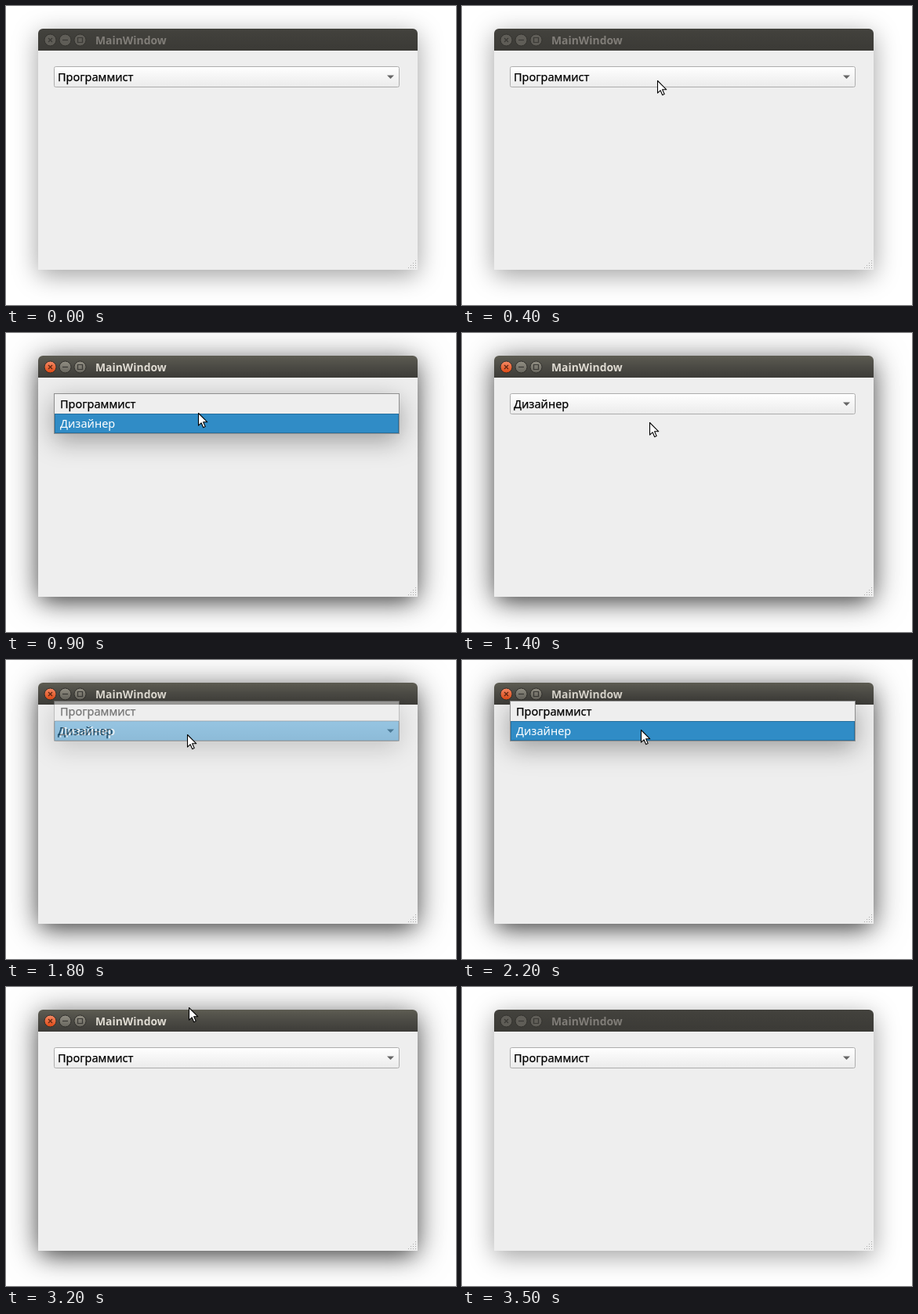
Animation of 574x382 px, one loop 3.6 s. Source, as an HTML page:

```html
<!DOCTYPE html>
<html lang="ru">
<head>
<meta charset="utf-8">
<title>MainWindow</title>
<style>
  html, body { margin: 0; width: 100%; height: 100%; overflow: hidden; background: #fff; }
  #stage { position: relative; width: 574px; height: 382px; overflow: hidden; background: #fff; }
  svg { position: absolute; left: 0; top: 0; overflow: visible; }
  text { font: 14.5px "Noto Sans", "Open Sans", sans-serif; fill: #000; stroke: #000; stroke-width: .25px; }
  #win { position: absolute; left: 41px; top: 29px; width: 484px; height: 308px;
    border-radius: 6px 6px 0 0; background: #eee; box-shadow: 0 7px 32px rgba(0,0,0,.38); }
  #bar { height: 28px; border-radius: 6px 6px 0 0; background: linear-gradient(#43423d, #3b3a36); }
  .active #win { box-shadow: 0 9px 24px -6px rgba(0,0,0,.45), 0 5px 40px rgba(0,0,0,.55); }
  .active #bar { background: linear-gradient(#5d5c52, #4d4c46 45%, #3d3c38); }
  #title { font-size: 13.9px; font-weight: 700; fill: #807d78; stroke: none; }
  .active #title { fill: #dfdbd2; }
  .btn circle { fill: #5f5d57; stroke: #33322e; }
  .btn path { fill: none; stroke: #3a3935; stroke-width: 1.2; }
  .active .btn circle { fill: url(#grey); stroke: #302f2b; }
  .active .btn.close circle { fill: url(#orange); }
  .active .btn.close path { stroke: #5c2512; }
  #pop { position: absolute; left: 61px; width: 441px; height: 52px; background: #eee;
    box-shadow: 0 9px 32px rgba(0,0,0,.34); }
  #pop text.on { fill: #fff; stroke: none; }
</style>
</head>
<body>
<div id="stage">
  <div id="win"><div id="bar"></div></div>
  <svg width="574" height="382">
    <defs>
      <linearGradient id="orange" x2="0" y2="1"><stop stop-color="#f58b66"/><stop offset="1" stop-color="#dd4814"/></linearGradient>
      <linearGradient id="grey" x2="0" y2="1"><stop stop-color="#918e83"/><stop offset="1" stop-color="#68665e"/></linearGradient>
      <linearGradient id="face" x2="0" y2="1"><stop stop-color="#fff"/><stop offset="1" stop-color="#ebebeb"/></linearGradient>
      <pattern id="dots" x="513" y="325" width="3" height="3" patternUnits="userSpaceOnUse"><rect width="1" height="1" fill="#a8a8a8"/></pattern>
    </defs>
    <g class="btn close" transform="translate(56.5 43.5)"><circle r="7.5"/><path d="M-2.5-2.5l5 5m0-5l-5 5"/></g>
    <g class="btn" transform="translate(75.5 43.5)"><circle r="7.5"/><path d="M-3.5 0h7"/></g>
    <g class="btn" transform="translate(94.5 43.5)"><circle r="7.5"/><path d="M-3-3h6v6h-6z"/></g>
    <text id="title" x="114" y="49">MainWindow</text>
    <rect x="61.5" y="77.5" width="440" height="26" rx="2" fill="url(#face)" stroke="#adadad"/>
    <path d="M486 88.5h9l-4.5 4.5z" fill="#666"/>
    <text id="value" x="66" y="96"></text>
    <path d="M522 325h3v12h-12v-3h3v-3h3v-3h3z" fill="url(#dots)"/>
  </svg>
  <div id="pop">
    <svg width="441" height="52">
      <rect x=".5" y=".5" width="440" height="51" fill="none" stroke="#8f8f8f"/>
      <rect id="mark" x="1.5" width="438" height="24" fill="#308cc6" stroke="#266f9e"/>
      <text x="8" y="19">Программист</text>
      <text x="8" y="44">Дизайнер</text>
    </svg>
  </div>
  <svg width="574" height="382">
    <path id="cursor" d="M.5.5V16.2L4.1 12.8 6.7 18.7 9.2 17.6 6.6 11.8H11.8Z" fill="#fff" stroke="#000" stroke-width="1.1" stroke-linejoin="round"/>
  </svg>
</div>
<script>
const LOOP = 3600, STEP = 100, ROW = 25;
const jobs = ["Программист", "Дизайнер"];
const $ = id => document.getElementById(id);
const rows = document.querySelectorAll("#pop text");

// straight pointer moves; it rests in between
const moves = [
  { from: 200, to: 300, x: 283, y: 84 },
  { from: 300, to: 400, x: 249, y: 95 },
  { from: 700, to: 900, x: 245, y: 102 },
  { from: 900, to: 1100, x: 239, y: 114 },
  { from: 1400, to: 1700, x: 231, y: 95 },
  { from: 1900, to: 2200, x: 228, y: 89 },
  { from: 2200, to: 2400, x: 226, y: 65 },
  { from: 2900, to: 3400, x: 237, y: 0 }
];

const clamp = v => Math.min(1, Math.max(0, v));
const within = (t, a, b) => t >= a && t < b;
const fade = (t, open, close) => clamp(Math.min(t - open, close - t) / STEP);

function pointer(t) {
  let x = 73, y = 39;
  for (const m of moves) {
    const k = clamp((t - m.from) / (m.to - m.from));
    x += (m.x - x) * k;
    y += (m.y - y) * k;
  }
  return [Math.round(x), Math.round(y)];
}

function draw(t) {
  $("stage").className = within(t, 600, 3500) ? "active" : "";
  const chosen = +within(t, 1300, 2600);
  const hover = +within(t, 900, 2300);
  $("value").textContent = jobs[chosen];

  // the list opens with the chosen row over the box
  $("pop").style.opacity = fade(t, 500, 1350) + fade(t, 1750, 2600);
  $("pop").style.top = 77 - ROW * (t > 1400) + "px";
  $("mark").setAttribute("y", 1.5 + hover * ROW);
  rows.forEach((r, i) => r.classList.toggle("on", i === hover));

  $("cursor").style.display = within(t, 200, 3500) ? "" : "none";
  $("cursor").setAttribute("transform", `translate(${pointer(t)})`);
}

const start = performance.now();
function tick() {
  const t = (performance.now() - start) % LOOP;
  draw(Math.floor(t / STEP) * STEP);
  requestAnimationFrame(tick);
}
tick();
</script>
</body>
</html>
```
